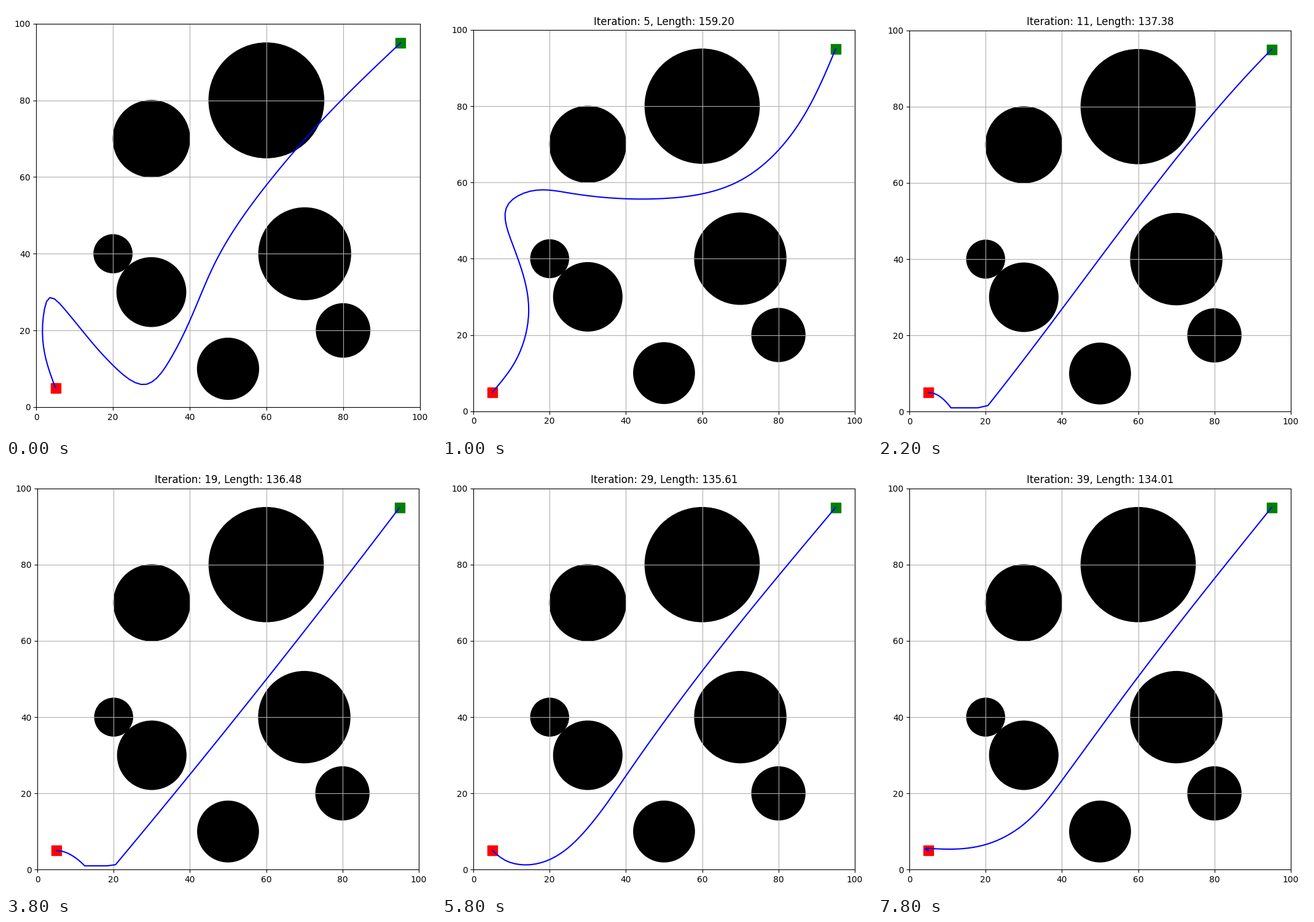
Animation of 700x700 px, one loop 8 s. Source, as a matplotlib script:

```python
import numpy as np
import matplotlib.pyplot as plt
from matplotlib.animation import FuncAnimation

FRAMES = 40
START, GOAL = (5, 5), (95, 95)
OBSTACLES = [(20, 40, 5), (30, 30, 9), (70, 40, 12), (60, 80, 15),
             (30, 70, 10), (80, 20, 7), (50, 10, 8)]


def spline(*pts, steps=100):
    """Natural cubic spline through pts, parametrised by chord length."""
    p = np.array(pts, float)
    h = np.hypot(*np.diff(p, axis=0).T)
    t = np.concatenate([[0], np.cumsum(h)])
    n = len(p)
    a, b = np.eye(n), np.zeros((n, 2))
    for i in range(1, n - 1):
        a[i, i - 1:i + 2] = h[i - 1], 2 * (h[i - 1] + h[i]), h[i]
        b[i] = 6 * ((p[i + 1] - p[i]) / h[i] - (p[i] - p[i - 1]) / h[i - 1])
    m = np.linalg.solve(a, b)
    u = np.linspace(0, t[-1], steps)
    k = np.clip(np.searchsorted(t, u, side="right") - 1, 0, n - 2)
    hk = h[k][:, None]
    l, r = (t[k + 1] - u)[:, None], (u - t[k])[:, None]
    return ((m[k] * l**3 + m[k + 1] * r**3) / (6 * hk)
            + (p[k] / hk - m[k] * hk / 6) * l
            + (p[k + 1] / hk - m[k + 1] * hk / 6) * r)


def floor_path(dip_x, dip_power, flat_x, rise, bow, p, q):
    """Drop to the lower bound, follow it, then climb to the goal on a bowed line."""
    s = np.linspace(0, 1, 40)
    drop = np.c_[START[0] + (dip_x - START[0]) * s, START[1] - 4 * s**dip_power]
    climb = np.outer(1 - s, rise) + np.outer(s, GOAL)
    climb[:, 1] += bow * s**p * (1 - s)**q
    return np.vstack([drop, [(flat_x, 1)], climb])


first = spline(START, (1.95, 24.5), (3.5, 28.55), (7.5, 25.4), (19.9, 11),
               (28.4, 5.9), (35, 12.6), (47, 38.4), (61.6, 59.9), (80, 80.5), GOAL)
detour = spline(START, (10.9, 12.9), (14.5, 25.9), (10.2, 44), (8.95, 54),
                (14.5, 57.6), (25, 57.25), (49, 55.75), (69.2, 60.1),
                (84, 73.4), GOAL)
low = floor_path(8.3, 1.4, 20.4, (23.1, 1.4), -15, 1, 3)
shorter = floor_path(10.9, 2, 17.9, (20.6, 1.6), 19, 2, 1)
tighter = floor_path(12.4, 1.9, 18.3, (20.5, 1.3), -4.5, 1, 1)
bowl = spline(START, (7.8, 2.75), (13.9, 1.25), (19.9, 2.6), (29.7, 10.6),
              (40, 24.6), (60, 52.1), GOAL)
hook = np.vstack([START, (4.1, 5.4), spline(
    (4.6, 5.6), (11.3, 5.38), (19.9, 6.55), (29.5, 11.5), (40, 23.4),
    (60, 50.6), GOAL)])

# (first iteration, path, length shown in the title)
BESTS = [(0, first, 0), (1, detour, 159.20), (6, low, 144.35),
         (10, shorter, 137.38), (15, tighter, 136.48), (22, bowl, 135.61),
         (33, bowl, 135.58), (38, hook, 134.01)]


def best(i):
    return [row for row in BESTS if row[0] <= i][-1][1:]


def show_title(i):
    ax.set_title(f"Iteration: {i}, Length: {best(i)[1]:.2f}" if i else "")


fig, ax = plt.subplots(figsize=(7, 7), dpi=100)
ax.set_aspect("equal")
ax.set_xlim(0, 100)
ax.set_ylim(0, 100)
ax.grid(True)
for x, y, r in OBSTACLES:
    ax.add_patch(plt.Circle((x, y), r, color="black"))
ax.plot(*START, "rs", markersize=11)
ax.plot(*GOAL, "gs", markersize=11)
line, = ax.plot([], [], "b-")

# the layout is tightened once per iteration and settles over time
layouts = []
for step in range(FRAMES):
    show_title(step)
    fig.tight_layout()
    layouts.append(ax.get_position(original=True).frozen())


def update(i):
    ax.set_position(layouts[i])
    line.set_data(*np.clip(best(i)[0], 1, 99).T)
    show_title(i)
    return line,


anim = FuncAnimation(fig, update, frames=FRAMES, interval=200,
                     repeat=True, repeat_delay=0, blit=False)
plt.show()
```
